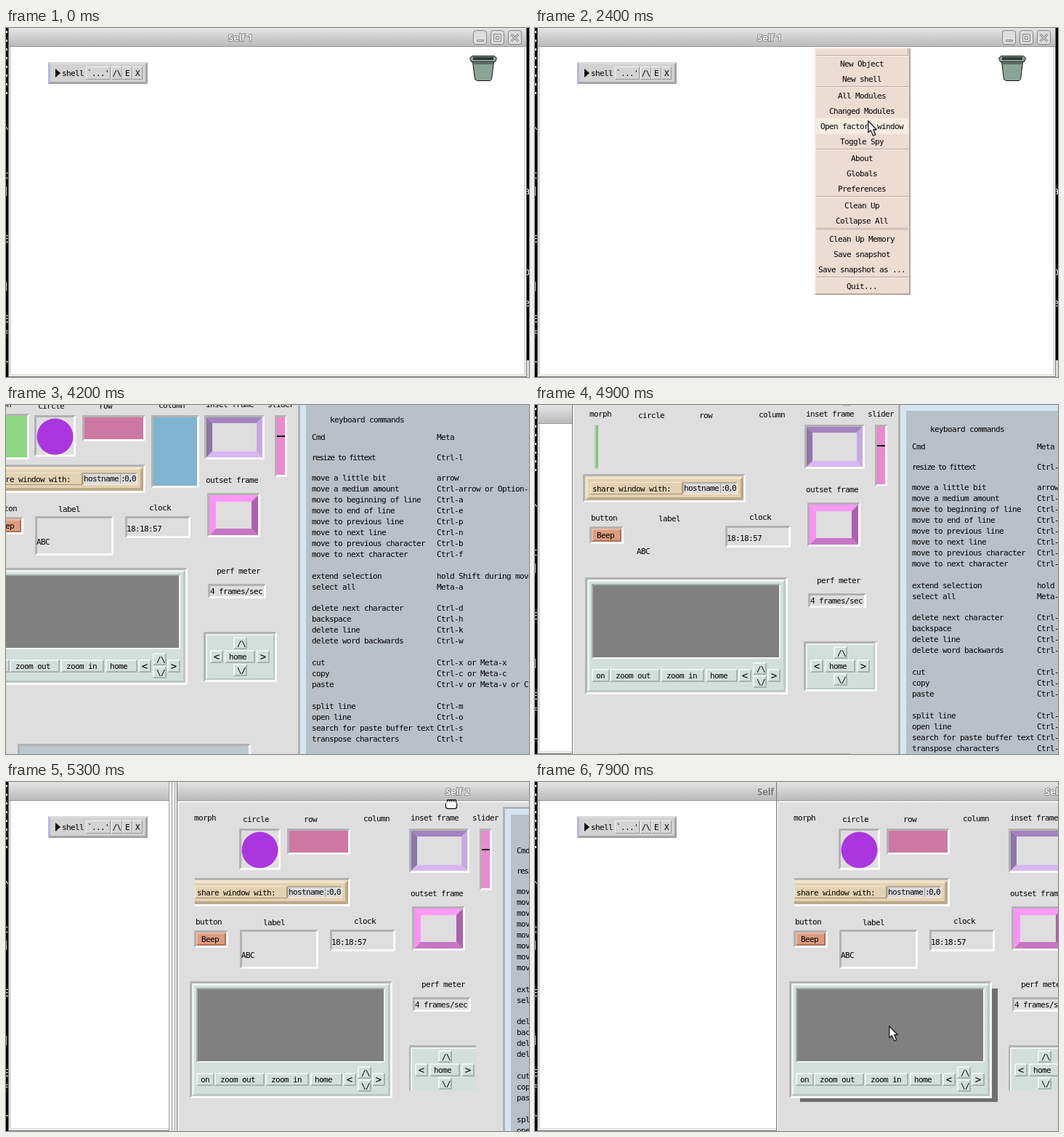
An HTML page with a canvas for the animation above (8000 ms loop, 720 by 480 pixels).

```html
<!DOCTYPE html>
<html>
<head>
<meta charset="utf-8">
<style>
html, body { margin: 0; width: 100%; height: 100%; overflow: hidden; background: #000; }
canvas { display: block; }
</style>
</head>
<body>
<canvas id="stage" width="720" height="480"></canvas>
<script>
const c = document.getElementById('stage').getContext('2d');
const BG = '#dedede', GREY = '#b2b2b2', WHITE = '#fafafa', MINT = '#d2dfdb';

// ---------- helpers ----------
function rect(x, y, w, h, fill) {
  c.fillStyle = fill;
  c.fillRect(x, y, w, h);
}

function poly(points, fill, stroke) {
  c.beginPath();
  for (const [x, y] of points) c.lineTo(x, y);
  c.closePath();
  if (fill) { c.fillStyle = fill; c.fill(); }
  if (stroke) { c.strokeStyle = stroke; c.stroke(); }
}

// text placed by its left edge and vertical middle
function text(s, x, y, align = 'left', spacing = -0.62, size = 11) {
  c.font = size + 'px "DejaVu Sans Mono", monospace';
  c.letterSpacing = spacing + 'px';
  c.textAlign = align;
  c.fillStyle = '#000';
  c.fillText(s, x, y + 4);
  c.letterSpacing = '0px';
}

// bevelled rectangle
function box(x, y, w, h, b, top, bottom, fill = BG, left = top, right = bottom) {
  const X = x + w, Y = y + h;
  rect(x, y, w, h, fill);
  poly([[x, y], [X, y], [X - b, y + b], [x + b, y + b]], top);
  poly([[x, y], [x + b, y + b], [x + b, Y - b], [x, Y]], left);
  poly([[x, Y], [x + b, Y - b], [X - b, Y - b], [X, Y]], bottom);
  poly([[X, y], [X, Y], [X - b, Y - b], [X - b, y + b]], right);
}
const inset = (x, y, w, h, fill) => box(x, y, w, h, 3, GREY, WHITE, fill);

function button(s, x, y, w, h = 18, tx = x + 8) {
  box(x, y, w, h, 2, '#eef6f3', '#a6b2ae', MINT);
  if (s == '<' || s == '>') text(s, x + w / 2, y + h / 2 + 1, 'center', 0, 14);
  else text(s, tx, y + h / 2);
}

function clipped(x, y, w, h, draw) {
  c.save();
  c.beginPath();
  c.rect(x, y, w, h);
  c.clip();
  draw();
  c.restore();
}

function checker(x, y, w, h) {
  c.fillStyle = '#000';
  for (let j = 0; j < h; j++)
    for (let i = 1 - j % 2; i < w; i += 2) c.fillRect(x + i, y + j, 1, 1);
}

// linear path through [time, x, y] keys; null outside of it
function along(keys, t) {
  if (t < keys[0][0] || t > keys[keys.length - 1][0]) return null;
  const i = Math.max(1, keys.findIndex(k => k[0] >= t));
  const [t0, x0, y0] = keys[i - 1], [t1, x1, y1] = keys[i];
  const p = (t - t0) / (t1 - t0);
  return [Math.round(x0 + (x1 - x0) * p), Math.round(y0 + (y1 - y0) * p)];
}

// ---------- desktop and first window ----------
function terminal() {
  rect(0, 0, 720, 480, '#000');
  for (let y = 4; y < 98; y += 12) rect(0, y, 2, 3, '#ddd');
  c.font = '14px "DejaVu Sans Mono", monospace';
  c.fillStyle = '#eee';
  c.textAlign = 'right';
  [['^', 142], ['t', 202], [']', 224], ['E', 290], [']', 355], ['E', 400], ['f', 422]]
    .forEach(([s, y]) => c.fillText(s, 4, y + 5));
  c.textAlign = 'left';
  [['a', 224], ['o', 335], ['e', 378]].forEach(([s, y]) => c.fillText(s, 713, y + 5));
  rect(716, 457, 4, 23, '#ddd');
  rect(0, 458, 3, 2, '#999');
}

function windowFrame(x, y, w, h, title, titleX, active, client) {
  rect(x, y, w, h, '#777');
  rect(x + 1, y, w - 2, h - 1, '#f6f6f6');
  rect(x + 2, y + 1, w - 4, h - 3, '#e4e4e4');
  const g = c.createLinearGradient(0, y, 0, y + 26);
  g.addColorStop(0, '#e4e4e4');
  g.addColorStop(1, '#b9b9b9');
  rect(x + 1, y, w - 2, 26, g);
  rect(x + 1, y + 25, w - 2, 1, '#999');
  rect(x + 4, y + 26, w - 8, h - 30, client);

  c.font = '600 13px "Open Sans", sans-serif';
  c.textAlign = 'center';
  if (active) {
    c.lineWidth = 2;
    c.strokeStyle = '#8c8c8c';
    c.strokeText(title, titleX, y + 18);
  }
  c.fillStyle = active ? '#fff' : '#6c6c6c';
  c.fillText(title, titleX, y + 18);

  for (let i = 0; i < 3; i++) {
    const bx = x + w - 73.5 + i * 24, by = y + 3.5;
    c.beginPath();
    c.roundRect(bx, by, 18, 19, 3);
    c.fillStyle = '#dedede';
    c.fill();
    c.lineWidth = 1;
    c.strokeStyle = '#858585';
    c.stroke();
    c.beginPath();
    if (i == 0) c.rect(bx + 5, by + 13, 9, 2);
    if (i == 1) { c.rect(bx + 4, by + 5, 10, 10); c.rect(bx + 7, by + 8, 4, 4); }
    if (i == 2) {
      c.moveTo(bx + 4, by + 5); c.lineTo(bx + 14, by + 15);
      c.moveTo(bx + 14, by + 5); c.lineTo(bx + 4, by + 15);
      c.lineWidth = 3; c.stroke();
      c.strokeStyle = '#fff'; c.lineWidth = 1;
    }
    c.stroke();
  }
}

function shell() {
  box(58, 47, 137, 30, 3, '#dadada', '#a4a4a4', '#d2d2d2', '#b4b4ea');
  poly([[68, 56], [75, 62], [68, 68]], '#000');
  text('shell', 77, 62);
  [["`...'", 110, 34], ['/\\', 145, 15], ['E', 160, 14], ['X', 174, 14]].forEach(([s, x, w]) => {
    box(x, 53, w, 18, 1, '#f4f4f4', '#989898', '#d4d4d4');
    text(s, x + w / 2, 62, 'center');
  });
}

function trash() {
  c.lineWidth = 1;
  poly([[642.5, 46.5], [671.5, 46.5], [668.5, 70.5], [666.5, 72.5], [648.5, 72.5], [645.5, 70.5]], '#89a596', '#111');
  rect(642, 48, 30, 2, '#4d6257');
  poly([[641.5, 38.5], [672.5, 38.5], [675.5, 41.5], [673.5, 46.5], [640.5, 46.5], [638.5, 41.5]], '#89a596', '#111');
  rect(643, 40, 28, 4, '#60756a');
  checker(643, 40, 28, 4);
}

const ITEMS = [['New Object', 49], ['New shell', 70], ['All Modules', 93], ['Changed Modules', 114],
  ['Open factory window', 135], ['Toggle Spy', 156], ['About', 179], ['Globals', 200],
  ['Preferences', 221], ['Clean Up', 244], ['Collapse All', 265], ['Clean Up Memory', 290],
  ['Save snapshot', 311], ['Save snapshot as ...', 332], ['Quit...', 355]];

function menu(pointerY) {
  box(385, 27, 132, 340, 2, '#f6e9e0', '#b8a79c', '#eddcd2');
  const rule = y => { rect(387, y, 127, 1, '#b8a79c'); rect(387, y + 1, 127, 1, '#f8ede6'); };
  [37, 80, 166, 231, 275, 277, 342].forEach(rule);
  rect(513, 28, 1, 10, '#b8a79c');
  for (const [s, y] of ITEMS) {
    if (Math.abs(pointerY - y) <= 10) rect(387, y - 11, 127, 22, '#f6ece0');
    text(s, 450, y, 'center');
  }
}

// ---------- factory window ----------
const KEYS = [
  ['move a little bit', 'arrow'], ['move a medium amount', 'Ctrl-arrow or Option-arrow'],
  ['move to beginning of line', 'Ctrl-a'], ['move to end of line', 'Ctrl-e'],
  ['move to previous line', 'Ctrl-p'], ['move to next line', 'Ctrl-n'],
  ['move to previous character', 'Ctrl-b'], ['move to next character', 'Ctrl-f'], 0,
  ['extend selection', 'hold Shift during move'], ['select all', 'Meta-a'], 0,
  ['delete next character', 'Ctrl-d'], ['backspace', 'Ctrl-h'], ['delete line', 'Ctrl-k'],
  ['delete word backwards', 'Ctrl-w'], 0,
  ['cut', 'Ctrl-x or Meta-x'], ['copy', 'Ctrl-c or Meta-c'], ['paste', 'Ctrl-v or Meta-v or Ctrl-y'], 0,
  ['split line', 'Ctrl-m'], ['open line', 'Ctrl-o'], ['search for paste buffer text', 'Ctrl-s'],
  ['transpose characters', 'Ctrl-t']];

function keyPanel() {
  inset(402, -16, 500, 600);
  box(405, -13, 494, 594, 8, '#d4e6f2', '#909aa2', '#b8c1c8');
  text('keyboard commands', 446, 20);
  text('Cmd', 421, 44);
  text('Meta', 593, 44);
  text('resize to fittext', 421, 72, 'left', -1.5);
  text('Ctrl-l', 593, 72);
  KEYS.forEach((k, i) => {
    if (!k) return;
    const y = Math.round(100 + i * 14.95);
    text(k[0], 421, y);
    text(k[1], 593, y);
  });
}

function share() {
  inset(-32, 82, 224, 39);
  box(-29, 85, 218, 33, 4, '#f1e3c8', '#bda988', '#e3d2b2');
  box(-22, 93, 127, 17, 1, '#f5ead4', '#a08e70', '#e3d2b2');
  text('share window with:', -19, 102);
  box(105, 93, 76, 17, 2, '#b4aa94', '#efe6d4', '#dadbdc');
  text('hostname', 107, 101);
  rect(157, 95, 1, 13, '#999');
  text(':0,0', 158, 101, 'left', -1.6);
}

function viewer() {
  inset(-29, 224, 279, 161);
  box(-26, 227, 273, 155, 3, '#eaf4f0', '#bac8c3', MINT);
  box(-20, 233, 260, 103, 2, '#a2aeaa', '#f2f8f5', '#808080');
  button('on', -20, 350, 25, 18, -14);
  button('zoom out', 5, 350, 69);
  button('zoom in', 75, 350, 60, 18, 83);
  button('home', 137, 350, 44, 18, 143);
  button('<', 182, 350, 18);
  button('/\\', 202, 341, 19, 17, 207);
  button('\\/', 202, 359, 19, 17, 207);
  button('>', 222, 350, 18);
}

function homePad() {
  inset(272, 312, 101, 69);
  box(275, 315, 95, 63, 2, '#eaf4f0', '#bac8c3', MINT);
  button('/\\', 313, 319, 19, 17, 318);
  button('<', 281, 337, 18);
  button('home', 301, 337, 42, 18, 307);
  button('>', 345, 337, 18);
  button('\\/', 313, 356, 19, 17, 318);
}

function widgets(ox, lifted) {
  const moved = ox > 0, torn = moved && ox < 200;
  [['morph', -23, -1], ['circle', 44, 1], ['row', 128, 1], ['column', 210, 0],
   ['inset frame', 275, -1], ['slider', 360, -1], ['outset frame', 275, 103], ['button', -21, 142],
   ['label', 72, 143], ['clock', 197, 141], ['perf meter', 290, 228]].forEach(l => text(...l));

  if (!moved) inset(-18, 12, 50, 63, '#8fd984');
  else if (torn) { rect(-16, 14, 5, 61, '#c4c4c4'); rect(-14, 15, 3, 58, '#7fc878'); }
  if (!torn) {
    inset(39, 14, 57, 57);
    c.fillStyle = '#ab36df';
    c.beginPath();
    c.arc(67.5, 43.5, 25, 0, 7);
    c.fill();
    inset(105, 14, 87, 36, '#cd78a3');
    inset(40, 153, 108, 54);
  }
  if (!moved) inset(200, 14, 66, 100, '#7fb5d0');

  inset(273, 14, 83, 61);
  box(276, 17, 77, 55, 8, '#a383c0', '#d8b6f4', BG, '#8e76a8', '#c8a8e4');
  inset(277, 121, 73, 61);
  box(280, 124, 67, 55, 9, '#ff98f8', '#c676c4', BG, '#ff92f4', '#ae60ac');
  inset(370, 14, 17, 85, '#ee88d0');
  rect(373, 42, 11, 2, '#000');

  if (ox > 200) clipped(-22, 70, 300, 60, share); else share();

  inset(-23, 154, 47, 24);
  box(-20, 157, 41, 18, 2, '#eeb8a0', '#a87058', '#dd9c80');
  text('Beep', -13, 166);
  text('ABC', 42, 188);
  inset(164, 153, 90, 30);
  text('18:18:57', 166, 170);
  inset(278, 246, 80, 20);
  text('4 frames/sec', 281, 256);

  if (lifted) checker(-14, 234, 272, 156);
  viewer();
  if (ox > 200) clipped(273, 312, 92, 62, homePad); else homePad();
  inset(16, 466, 321, 80, '#bcc8d0');
}

function factory(t, ox, oy) {
  // trail of stale left edges while dragging
  if (ox > 200 && t < 5500)
    for (let x = ox - 58; x < ox - 47; x += 4) {
      rect(x, 0, 4, 480, '#f0f0f0');
      rect(x, 0, 1, 480, '#a0a0a0');
    }
  windowFrame(ox - 47, oy - 50, 854, 640, 'Self 2', ox + 340, true, t < 2800 ? '#fff' : BG);
  rect(ox - 43, oy - 24, 846, 2, '#f4f4f4');
  if (t < 2900) return;
  c.save();
  c.translate(ox, oy);
  widgets(ox, t >= 7900);
  if (t >= 3000) keyPanel();
  c.restore();
}

// ---------- pointer ----------
const DRAG = [[4600, 0, 0], [4900, 98, 13], [5300, 282, 50], [5500, 379, 50], [8000, 379, 50]];
const POINTER = [
  [[800, 450, 30], [1300, 470, 392], [1600, 468, 322], [1700, 440, 80], [1800, 440, 80],
   [1900, 462, 168], [2400, 458, 127], [3600, 458, 127], [4200, 331, -26]],
  [[5900, 740, 74], [6300, 347, 207]],
  [[6600, 679, 295], [7400, 494, 330], [7500, 470, 210], [7600, 435, 73], [7700, 487, 335], [8000, 487, 335]]];

function arrow([x, y]) {
  c.lineWidth = 1.4;
  c.lineJoin = 'round';
  poly([[0, 0], [0, 16], [3.5, 13], [7, 20.5], [10, 19], [7, 12], [11.5, 12]]
    .map(p => [x + 0.7 + p[0], y + 0.7 + p[1]]), '#fff', '#222');
  c.lineJoin = 'miter';
}

function hand(x, y) {
  c.lineWidth = 1.5;
  c.fillStyle = '#fff';
  c.strokeStyle = '#111';
  c.beginPath();
  for (let i = 0; i < 4; i++) c.roundRect(x + 2.5 + i * 3, y + 0.5, 3, 6, 1.5);
  c.fill();
  c.stroke();
  c.beginPath();
  c.roundRect(x + 0.5, y + 4.5, 15, 8, 3);
  c.stroke();
  c.beginPath();
  c.roundRect(x + 1, y + 3, 14, 9, 3);
  c.fill();
}

function draw(t) {
  const pointer = POINTER.map(k => along(k, t)).find(Boolean);
  const [ox, oy] = along(DRAG, t) || [0, 0];
  terminal();
  windowFrame(3, 0, 714, 480, 'Self 1', 323, t < 2700, '#fff');
  rect(4, 26, 3, 450, '#dcdcdc');
  rect(713, 26, 2, 450, '#dcdcdc');
  shell();
  trash();
  if (t >= 900 && t < 2600) menu(t >= 1900 ? pointer[1] + 8 : -99);
  if (t >= 2700) factory(t, ox, oy);
  if (pointer) arrow(pointer);
  else if (t > 4200 && t < 5600) hand(ox + 323, oy - 26);
}

function tick(now) {
  draw(Math.floor(now % 8000 / 100) * 100);
  requestAnimationFrame(tick);
}
draw(0);
requestAnimationFrame(tick);
</script>
</body>
</html>
```
